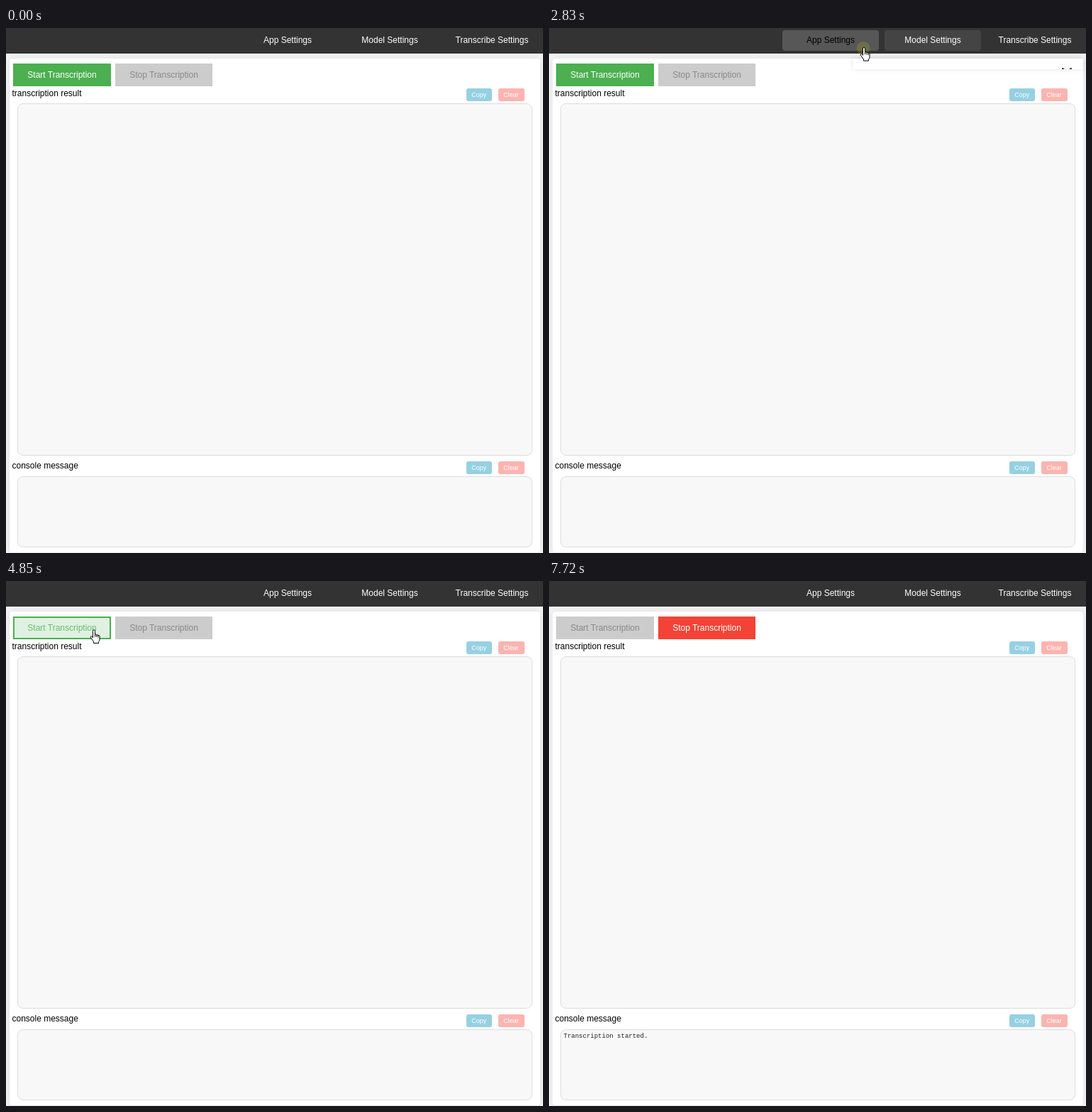
Recreate the animation shown at these times as an HTML page. Size 757 by 739 pixels, loop 8000 ms.

```html
<!DOCTYPE html>
<html lang="en">
<head>
<meta charset="utf-8">
<title>Transcription app</title>
<style>
html, body { margin: 0; width: 100%; height: 100%; overflow: hidden; background: #f4f4f4; }
#stage { position: absolute; left: 0; top: 0; width: 757px; height: 739px; overflow: hidden;
  font: 12px "Liberation Sans", Arial, sans-serif; color: #000; }
#stage div, svg { position: absolute; box-sizing: border-box; white-space: pre; }
svg { overflow: visible; left: 0; top: 0; }
.nav { background: #333; }
.card { background: #fff; border-radius: 4px; box-shadow: 0 0 8px rgba(0,0,0,.1); }
.tab { border-radius: 4px; text-align: center; }
.main { border: 2px solid; text-align: center; }
.area { background: #f8f8f8; border: 1px solid #ddd; border-radius: 8px; }
.mini { border-radius: 3px; color: #fff; font-size: 9px; text-align: center; }
.copy { background: #96d0e2; }
.clear { background: #fcb4b0; }
.panel { background: rgba(255,255,255,.6); box-shadow: 0 0 8px rgba(0,0,0,.1); overflow: hidden; }
.note { font-size: 10.87px; font-style: italic; color: #555; }
.label { text-align: right; }
.field { background: #fff; border: 1px solid #767676; border-radius: 2px; font-size: 10px; overflow: hidden; }
.mono { font: 9px "Liberation Mono", "Courier New", monospace; color: #222; }
</style>
</head>
<body>
<div id="stage"></div>
<script>
const stage = document.getElementById('stage');

function box(parent, cls, x, y, w, h, text = '') {
  const el = document.createElement('div');
  el.className = cls;
  el.textContent = text;
  const edge = cls === 'main' ? 4 : cls === 'field' ? 2 : 0;
  el.style.cssText = `left:${x}px;top:${y}px;width:${w}px;height:${h}px;line-height:${h - edge}px`;
  parent.append(el);
  return el;
}

function svg(parent, body) {
  parent.insertAdjacentHTML('beforeend', `<svg width="757" height="739" fill="none">${body}</svg>`);
  return parent.lastElementChild;
}

// Static page
box(stage, 'nav', 0, 0, 757, 35.5);
box(stage, 'card', 5, 43, 748, 695);
const tabs = ['App', 'Model', 'Transcribe'].map((name, i) =>
  box(stage, 'tab', 329 + 144 * i, 3, 136, 28.5, name + ' Settings'));
const start = box(stage, 'main', 10, 50, 138, 32, 'Start Transcription');
const stop = box(stage, 'main', 154, 50, 137, 32, 'Stop Transcription');

function section(title, y, top, h) {
  box(stage, '', 8.5, y - 9, 200, 14, title);
  box(stage, 'mini copy', 648.5, y - 8.5, 36.5, 18, 'Copy');
  box(stage, 'mini clear', 693.5, y - 8.5, 37, 18, 'Clear');
  box(stage, 'area', 16, top, 726, h);
}
section('transcription result', 93.5, 106, 496);
section('console message', 618, 630.5, 100.5);
const message = box(stage, 'mono', 20.5, 635, 200, 12, 'Transcription started.');

// Settings panels; each row is label, centre y, kind, width, value
function panel(rows) {
  const el = box(stage, 'panel', 429, 43, 324, 0);
  const page = box(el, '', -429, -43, 757, 739);
  box(page, 'note', 433, 57, 300, 13, 'Note: Hover over the labels for more information.');
  box(page, 'note', 433, 69.5, 300, 13, '* is Mandatory field.');
  svg(page, '<path d="M723.5 56.5l13 13m0-13l-13 13" stroke="#222" stroke-width="2.2"/>');
  for (const [name, y, kind, w, value] of rows) {
    box(page, 'label', 429, y - 7.5, 117, 15, name + ':');
    if (kind === 'check') { box(page, 'field', 557, y - 4.5, 10, 10); continue; }
    const select = kind === 'select';
    const f = box(page, 'field', 554, y - 7, w, select ? 15 : 16, value);
    f.style.paddingLeft = select ? '3px' : '2px';
    if (select) {
      f.style.borderRightWidth = '1px';
      box(page, '', 554 + w - 14, y - 6, 13, 13).style.background = '#fff';
      svg(page, `<path d="M${554 + w - 10.5} ${y - 1}l3 3 3-3" stroke="#000" stroke-width="1.8"/>`);
    }
  }
  return el;
}
const modelPanel = panel([
  ['*Model Size or Path', 100, 'select', 73, 'large-v2'],
  ['*Device', 122, 'select', 40, 'cuda'],
  ['*Device Index', 144.5, 'input', 196, '0'],
  ['*Compute Type', 167.5, 'select', 70, 'default'],
  ['*CPU Threads', 190, 'input', 36, '0'],
  ['*Number of Workers', 213.5, 'input', 36, '2'],
  ['Download Root', 237, 'input', 196, ''],
  ['*Local Files Only', 259.5, 'check']
]);
const appPanel = panel([
  ['*Audio Device', 100, 'select', 196, 'PATCH-A Output (QL-Sonic Patch MME)'],
  ['*Silence limit', 122.5, 'input', 36, '20'],
  ['*Noise threshold', 146, 'input', 36, '7']
]);

const pointer = svg(stage, `
  <circle r="9.5" cx="-1" cy="1" fill="#ffeb00" fill-opacity=".65"/>
  <g fill="#fff" stroke="#000" stroke-linejoin="round">
    <path d="M.5.5V14.5L3.7 11.6 5.8 16.5 8 15.5 6 10.8H10.5Z"/>
    <path d="M-1.5 1.3a1.5 1.5 0 0 1 3 0V6.5q1.2-1 2.3.5 1.2-.9 2.2.5 1.8-.6 2 1.2V13q0 2-1.5 3.5V18.5H-.5V16.5L-4.7 10.5q-.6-1.8 1.2-1.6l2 1.8zM1.5 6.5v3M3.8 7v3M6 7.5v3"/>
  </g>`);
const ring = pointer.querySelector('circle');
const [arrow, hand] = pointer.querySelectorAll('path');

// Timing, in ms
const LOOP = 8000;
const OPEN_MODEL = 950, OPEN_APP = 2630, CLOSE_APP = 3840, HOVER_START = 4500, RUN = 5330;
const path = [ // time, x, y
  [160, 736, 728], [820, 537, 22], [1830, 537, 22], [2420, 408, 23], [2690, 408, 23],
  [3370, 732, 65], [3850, 732, 65], [4480, 124, 69], [5400, 124, 69], [5870, 685, 145]
];
const presses = [[860, 960], [2440, 2640], [3640, 3850], [5250, 5380]];

const GREEN = [76, 175, 80], WHITE = [255, 255, 255], GRAY = [204, 204, 204],
  DIM = [136, 136, 136], RED = [244, 67, 54];

const ramp = (t, from, len) => Math.min(1, Math.max(0, (t - from) / len));
const easeOut = p => 1 - (1 - p) ** 2;
const smooth = p => p * p * (3 - 2 * p);
const mix = (a, b, p) => a + (b - a) * p;
const blend = (a, b, p) => a.map((v, i) => mix(v, b[i], p));
const rgb = c => `rgb(${c.map(Math.round)})`;

function paint(el, fill, ink, border = fill) {
  el.style.background = rgb(fill);
  el.style.color = rgb(ink);
  el.style.borderColor = rgb(border);
}

function drawTab(el, t, hover, open, close) {
  let level = mix(51, 85, ramp(t, hover, 130));
  level = mix(level, 136, Math.min(1, .33 * (Math.max(0, t - open) / 550) ** 2));
  level = mix(level, 51, ramp(t, close, 250));
  const active = t >= open && t < close;
  paint(el, [level, level, level], active ? [0, 0, 0] : WHITE);
}

function drawPanel(el, t, open, close, full) {
  const h = Math.min(full, 110 * ((t - open) / 550) ** 2);
  el.style.display = t >= open && t < close ? '' : 'none';
  el.style.height = h + 'px';
}

function drawPointer(t) {
  pointer.style.display = t >= 160 && t < 5870 ? '' : 'none';
  const i = Math.max(0, path.findLastIndex(k => k[0] <= t));
  const a = path[i], b = path[i + 1] || a;
  const p = a === b ? 0 : smooth(ramp(t, a[0], b[0] - a[0]));
  const x = mix(a[1], b[1], p), y = mix(a[2], b[2], p);
  pointer.style.transform = `translate(${x}px,${y}px)`;
  const over = (l, top, r, bottom) => x > l && x < r && y > top && y < bottom;
  const link = over(329, 3, 465, 32) || over(473, 3, 609, 32) ||
    (over(722, 55, 740, 71) && t < CLOSE_APP) || (over(10, 50, 148, 82) && t < RUN + 100);
  hand.style.display = link ? '' : 'none';
  arrow.style.display = link ? 'none' : '';
  ring.style.opacity = Math.max(...presses.map(([on, off]) => t < on ? 0 : 1 - ramp(t, off, 250)));
}

function draw(t) {
  drawTab(tabs[0], t, 2320, OPEN_APP, CLOSE_APP);
  drawTab(tabs[1], t, 760, OPEN_MODEL, OPEN_APP);
  drawTab(tabs[2], t, LOOP, LOOP, LOOP);
  drawPanel(modelPanel, t, OPEN_MODEL, OPEN_APP, 236);
  drawPanel(appPanel, t, OPEN_APP, CLOSE_APP, 123);

  const hover = easeOut(ramp(t, HOVER_START, 600));
  const run = easeOut(ramp(t, RUN, 500));
  paint(start,
    blend(blend(GREEN, WHITE, hover), GRAY, run),
    blend(blend(WHITE, GREEN, hover), DIM, run),
    blend(GREEN, GRAY, run));
  paint(stop, blend(GRAY, RED, run), blend(DIM, WHITE, run));
  message.style.display = t >= 7720 ? '' : 'none';
  drawPointer(t);
}

const origin = performance.now();
function frame() {
  draw((performance.now() - origin) % LOOP);
  requestAnimationFrame(frame);
}
frame();
</script>
</body>
</html>
```
